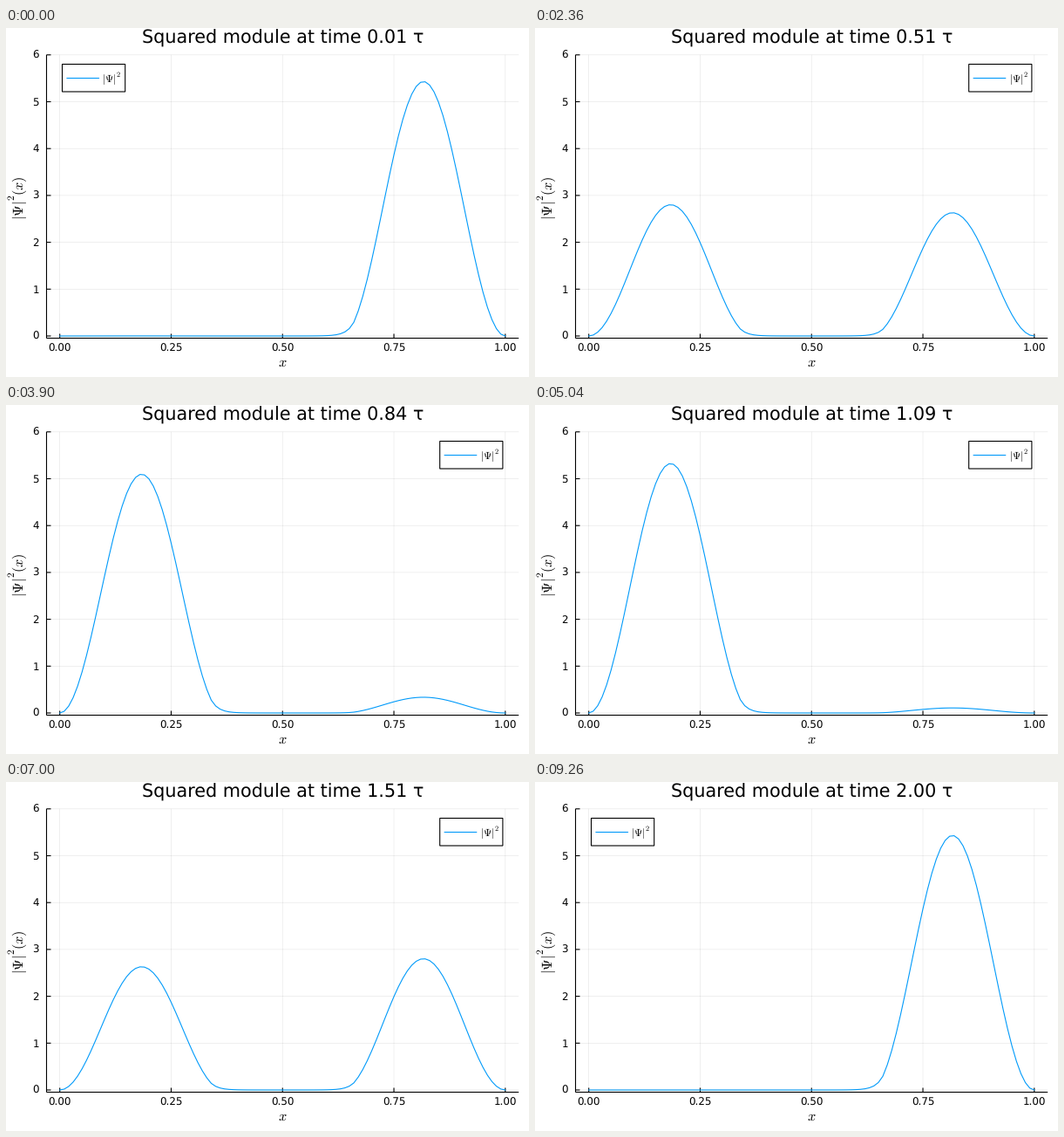
Animation of 600 by 400 pixels, one loop 9.28 s. Source, as a matplotlib script:

```python
import numpy as np
import matplotlib.pyplot as plt
from matplotlib.animation import FuncAnimation
from matplotlib.patches import Rectangle

W, H, DPI = 600, 400, 100
PT = 72 / DPI  # points per pixel
TICK_MS, LOOP_MS = 20, 9280
BLUE = "#009afa"

LEFT, RIGHT, TOP, BOTTOM = 46.5, 588.2, 30.8, 355.5
LEGEND_LEFT, LEGEND_RIGHT = 64.5, 497.7

plt.rcParams.update({"font.family": "DejaVu Sans", "mathtext.fontset": "cm",
                     "text.hinting": "none"})


def px(x):
    return 61.7 + 511.1 * np.asarray(x)


def py(y):
    return 353.0 - 53.7 * np.asarray(y)


def well_densities(x, barrier=1000.0):
    """Left and right densities from the two lowest double-well states."""
    h = x[1] - x[0]
    inner = x[1:-1]
    potential = np.where(abs(inner - 0.5) < 1 / 6, barrier, 0.0)
    hop = np.full(len(inner) - 1, -1 / h**2)
    energy = np.diag(2 / h**2 + potential) + np.diag(hop, 1) + np.diag(hop, -1)
    even, odd = np.linalg.eigh(energy)[1][:, :2].T
    pair = [np.pad((even + s * odd) ** 2 / (2 * h), 1) for s in (1, -1)]
    return sorted(pair, key=lambda d: np.sum(d * x))


grid = np.linspace(0, 1, 101)
left_state, right_state = well_densities(grid)

fig = plt.figure(figsize=(W / DPI, H / DPI), dpi=DPI, facecolor="white")
ax = fig.add_axes([0, 0, 1, 1])
ax.set(xlim=(0, W), ylim=(H, 0))
ax.axis("off")


def label(x, y, text, size, **kw):
    return ax.text(x, y, text, fontsize=size * PT, color="black",
                   va="baseline", **kw)


x_ticks = np.linspace(0, 1, 5)
y_ticks = np.arange(7)

# Grid, axes and inward ticks
faint = dict(colors="black", alpha=0.1, linewidths=0.6 * PT,
             snap=False, zorder=1)
ax.vlines(px(x_ticks), TOP, BOTTOM, **faint)
ax.hlines(py(y_ticks), LEFT, RIGHT, **faint)
solid = dict(colors="black", linewidths=1.1 * PT, snap=False, zorder=2)
ax.vlines([LEFT], TOP, BOTTOM, **solid)
ax.hlines([BOTTOM], LEFT, RIGHT, **solid)
ax.vlines(px(x_ticks), BOTTOM - 5, BOTTOM, **solid)
ax.hlines(py(y_ticks), LEFT, LEFT + 5, **solid)

for v in x_ticks:
    label(px(v), 371.3, f"{v:.2f}", 11.85, ha="center")
for v in y_ticks:
    label(38, py(v) + 4.3, str(v), 11.85, ha="right")
label(317, 388, "$x$", 16.3, ha="center")
title = label(317.3, 18, "", 20.8, ha="center")

# Vertical axis label, with the exponent raised to the top of the bars
EM, BAR_WIDTH, RISE = 16.3, 1.334, 0.58
upright = dict(ha="left", rotation=90, rotation_mode="anchor")
start, base = 219.5, 19.8
label(base, start, r"$|\Psi|$", EM, **upright)
label(base - RISE * EM, start - BAR_WIDTH * EM, "$2$", 0.7 * EM, **upright)
label(base, start - (BAR_WIDTH + 0.35) * EM, "$(x)$", EM, **upright)

stroke = dict(color=BLUE, lw=1.1 * PT, snap=False)
curve, = ax.plot([], [], solid_joinstyle="round", zorder=3, **stroke)

# Legend
KEY_EM = 11.85
box = Rectangle((LEGEND_LEFT, 41.5), 72.2, 31.5, fc="white", ec="black",
                lw=1.1 * PT, snap=False, zorder=4)
ax.add_patch(box)
key, = ax.plot([], [], zorder=5, **stroke)
key_text = label(0, 62.5, r"$|\Psi|$", KEY_EM, ha="left", zorder=5)
key_power = label(0, 62.5 - RISE * KEY_EM, "$2$", 0.7 * KEY_EM,
                  ha="left", zorder=5)


def place_legend(x):
    box.set_x(x)
    key.set_data([x + 5.5, x + 42], [57.5, 57.5])
    key_text.set_x(x + 46)
    key_power.set_x(x + 46 + BAR_WIDTH * KEY_EM)


def step_at(i):
    """Steps are held for 1, 5 and 1 ticks in turn."""
    cycle, r = divmod(i, 7)
    return 3 * cycle + (r > 0) + (r > 5)


def update(i):
    t = (step_at(i) + 1) / 100
    p = np.cos(np.pi * t / 2) ** 2
    curve.set_data(px(grid), py(p * right_state + (1 - p) * left_state))
    title.set_text(f"Squared module at time {t:.2f} τ")
    place_legend(LEGEND_LEFT if abs(t - 1) > 0.735 else LEGEND_RIGHT)
    return curve, title, box, key, key_text, key_power


anim = FuncAnimation(fig, update, frames=LOOP_MS // TICK_MS,
                     interval=TICK_MS, repeat=True, repeat_delay=0)
plt.show()
```
